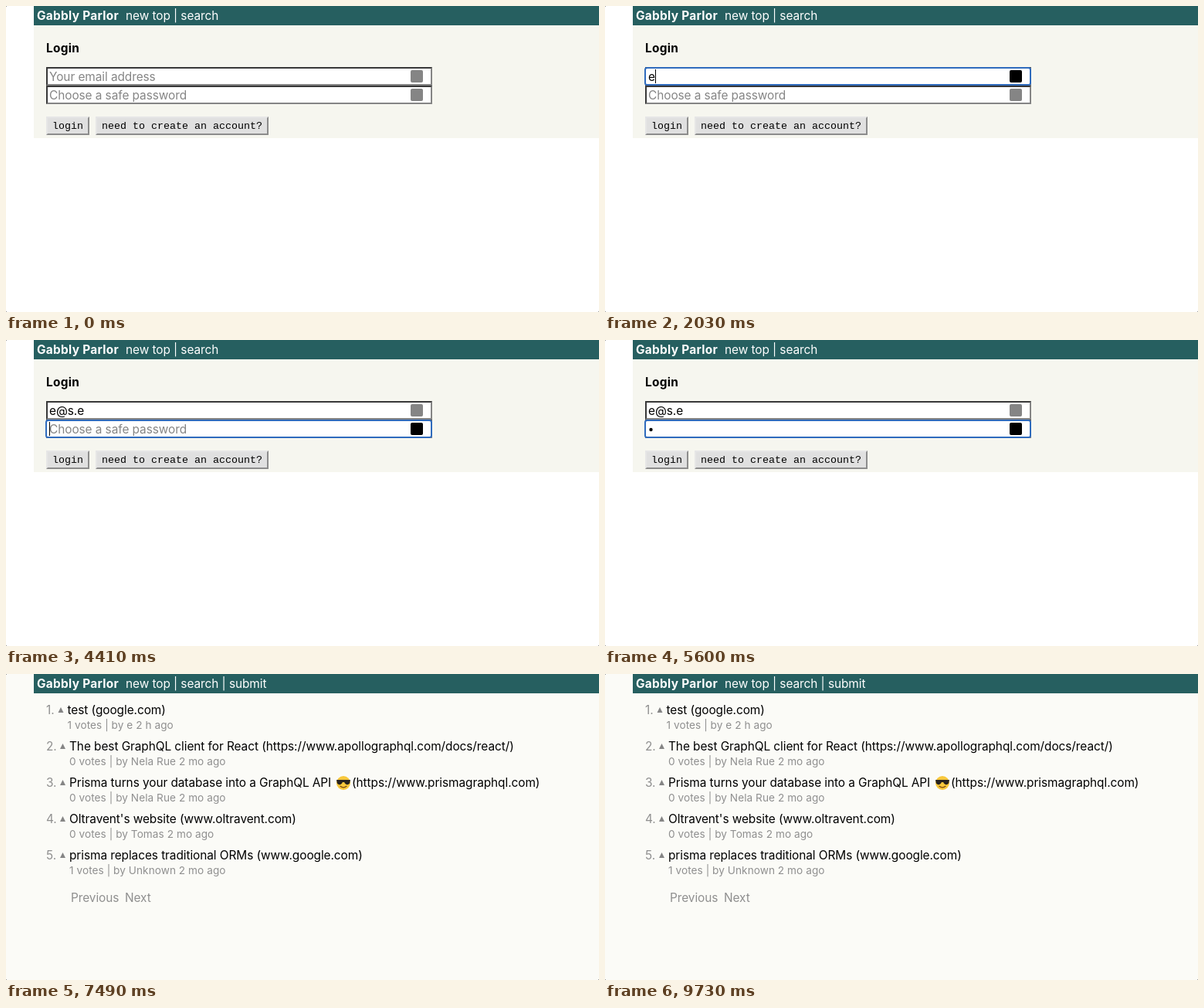
An HTML page for the animation above (9870 ms loop, 768x396 px).

```html
<!DOCTYPE html>
<html lang="en">
<head>
<meta charset="utf-8">
<title>Forum login</title>
<style>
  html, body { margin: 0; width: 100%; height: 100%; overflow: hidden; background: #fff; }
  svg { display: block; width: 768px; height: 396px; }
  text { font: 400 15.4px Inter, "Noto Sans", sans-serif; letter-spacing: -.065px; white-space: pre; }
  .bold { font-weight: 700; letter-spacing: .3px; }
  .small { font-size: 13.6px; letter-spacing: .065px; }
  .mono { font: 13.333px "Liberation Mono", monospace; letter-spacing: 0; }
  .grey { fill: #858585; }
  .pale { fill: #8f8f8f; }
  .light { fill: #fff; }
</style>
</head>
<body>
<svg id="stage" viewBox="0 0 768 396" xmlns="http://www.w3.org/2000/svg"></svg>
<script>
const LOOP = 9870;
const LIST_AT = 7490;
const FIELD_X = 56;
const MAIL = 'e@s.e';

// time, focused field, typed letters, password dots, caret shown
const STEPS = [
  [0, '', 0, 0, 0],
  [1470, 'mail', 0, 0, 1],
  [1890, 'mail', 1, 0, 1],
  [2590, 'mail', 1, 0, 0],
  [2940, 'mail', 2, 0, 1],
  [3500, 'mail', 3, 0, 1],
  [3640, 'mail', 4, 0, 1],
  [3780, 'mail', 5, 0, 1],
  [4410, 'pass', 5, 0, 1],
  [4830, 'pass', 5, 1, 1],
  [5600, 'pass', 5, 1, 0],
  [5950, 'pass', 5, 1, 1],
  [6650, '', 5, 1, 0]
];

const POSTS = [
  ['test (google.com)', '1 votes | by e 2 h ago'],
  ['The best GraphQL client for React (https://www.apollographql.com/docs/react/)', '0 votes | by Nela Rue 2 mo ago'],
  ['Prisma turns your database into a GraphQL API', '0 votes | by Nela Rue 2 mo ago'],
  ["Oltravent's website (www.oltravent.com)", '0 votes | by Tomas 2 mo ago'],
  ['prisma replaces traditional ORMs (www.google.com)', '1 votes | by Unknown 2 mo ago']
];

const rect = (x, y, w, h, fill, more = '') =>
  `<rect x="${x}" y="${y}" width="${w}" height="${h}" fill="${fill}" ${more}/>`;

const text = (x, y, words, cls = '', id = '') =>
  `<text x="${x}" y="${y}" class="${cls}" ${id && `id="${id}"`}>${words}</text>`;

// Box with a two-tone 2px border
function bevel(x, y, w, h, topLeft, bottomRight, fill) {
  const r = x + w, b = y + h;
  return rect(x, y, w, h, bottomRight) +
    `<path fill="${topLeft}" d="M${x} ${b}V${y}H${r}l-2 2H${x + 2}V${b - 2}z"/>` +
    rect(x + 2, y + 2, w - 4, h - 4, fill);
}

function field(id, y, hint) {
  return bevel(52, y, 500, 24, '#383838', '#858585', '#fff') +
    rect(52, y + 1, 499, 22, '#fff', `id="${id}Ring" stroke="#2f6bbd" stroke-width="2" rx="2.5"`) +
    text(FIELD_X, y + 18, hint, 'grey', id + 'Hint') +
    rect(524, y + 4, 16, 16, '#858585', `id="${id}Icon" rx="2"`);
}

function button(x, w, label) {
  return bevel(x, 143, w, 24, '#e6e6e6', '#8c8c8c', '#e0e0e0') + text(x + 8, 159, label, 'mono');
}

function loginPage() {
  return rect(36, 25, 732, 146, '#f6f6ef') +
    text(52, 60, 'Login', 'bold') +
    field('mail', 79, 'Your email address') +
    field('pass', 103, 'Choose a safe password') +
    text(FIELD_X, 97, '', '', 'mailText') +
    '<circle id="dot" cx="59.5" cy="116" r="2.2"/>' +
    rect(0, 0, 1, 18, '#000', 'id="caret"') +
    button(52, 56, 'login') +
    button(116, 224, 'need to create an account?');
}

function shades(cx, cy) {
  return `<g transform="translate(${cx} ${cy})">
    <circle r="9" fill="#f8c83c"/>
    <path d="M-9-4H9L8.2 0C7 3 2.4 3 1.2-1H-1.2C-2.4 3-7 3-8.2 0z" fill="#26221f"/>
    <path d="M-4 4.3Q0 7.4 4 4.3" fill="none" stroke="#7a4a12" stroke-width="1.3" stroke-linecap="round"/>
  </g>`;
}

function post([title, meta], i) {
  const y = 52 + 47 * i, x = i ? 82 : 79.5;
  return text(52, y, i + 1 + '.', 'pale') +
    `<path d="M${x - 12} ${y - 2}l3.5-7 3.5 7z" fill="#858585"/>` +
    text(x, y, title) +
    text(x, y + 19, meta, 'small pale');
}

function listPage() {
  return rect(0, 0, 768, 396, '#fbfbf7') +
    POSTS.map(post).join('') +
    shades(437, 141) +
    text(448, 146, '(https://www.prismagraphql.com)') +
    text(84, 295, 'Previous', 'pale') +
    text(154, 295, 'Next', 'pale');
}

document.getElementById('stage').innerHTML =
  rect(0, 0, 768, 396, '#fff') +
  `<g id="login">${loginPage()}</g><g id="list">${listPage()}</g>` +
  rect(36, 0, 732, 25, '#265f60') +
  text(40, 18, 'Gabbly Parlor', 'bold light') +
  text(155, 18, 'new top | search<tspan id="submit"> | submit</tspan>', 'light') +
  [[0, 0], [0, 395], [767, 395]].map(([x, y]) => rect(x, y, 1, 1, '#999')).join('');

const el = id => document.getElementById(id);
const show = (id, on) => { el(id).style.display = on ? '' : 'none'; };

function draw(t) {
  const listed = t >= LIST_AT;
  show('login', !listed);
  show('list', listed);
  show('submit', listed);
  if (listed) return;

  const [, focus, typed, dots, caret] = STEPS.filter(step => step[0] <= t).pop();
  for (const id of ['mail', 'pass']) {
    show(id + 'Ring', focus === id);
    el(id + 'Icon').setAttribute('fill', focus === id ? '#000' : '#858585');
  }
  show('mailHint', !typed);
  show('passHint', !dots);
  show('dot', dots);
  show('caret', caret);

  const mail = el('mailText');
  mail.textContent = MAIL.slice(0, typed);
  const inMail = focus === 'mail';
  const width = inMail ? (typed ? mail.getComputedTextLength() : 0) : dots * 7;
  el('caret').setAttribute('x', Math.round(FIELD_X + width));
  el('caret').setAttribute('y', inMail ? 82 : 106);
}

const start = performance.now();
function tick() {
  draw((performance.now() - start) % LOOP);
  requestAnimationFrame(tick);
}
tick();
</script>
</body>
</html>
```
